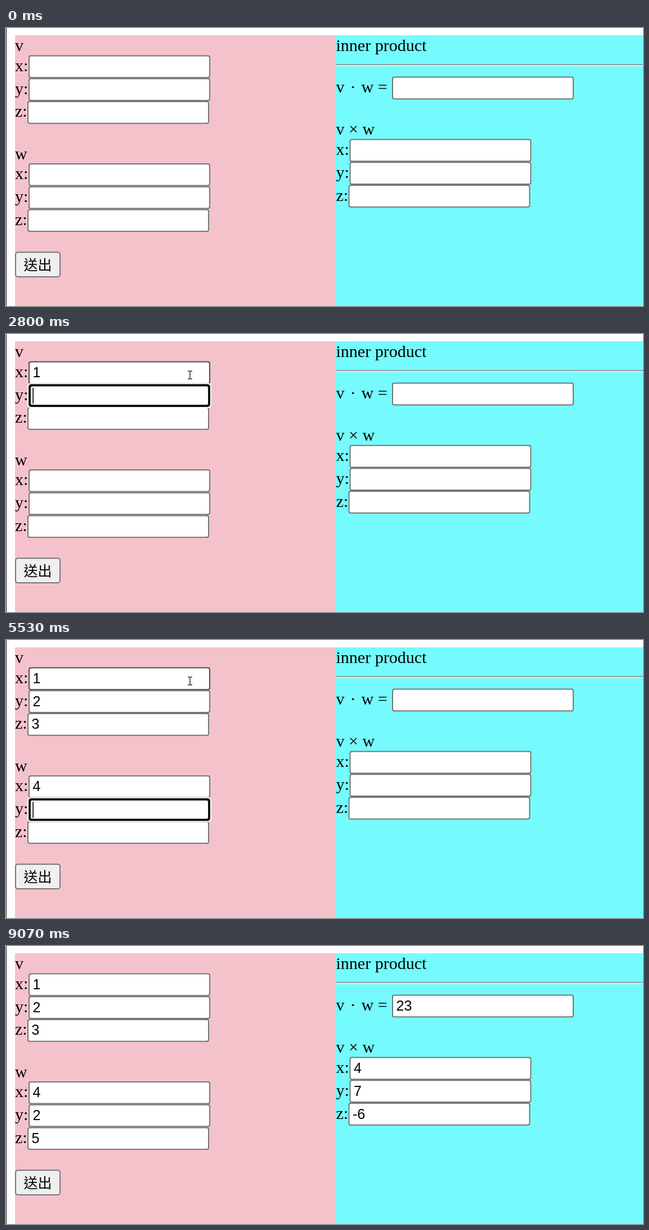
Write an HTML page that moves like this. It is 1132 px wide and 495 px high and loops after 9.87 s.

```html
<!DOCTYPE html>
<html lang="zh-Hant">
<head>
<meta charset="utf-8">
<title>Vector products</title>
<style>
  html, body { margin: 0; width: 100%; height: 100%; overflow: hidden; background: #fff; }
  svg { display: block; width: 1132px; height: 495px; }
  text { white-space: pre; }
  .label { font: 30px "Liberation Serif", "Times New Roman", serif; }
  .value { font: 25px "Liberation Sans", Arial, sans-serif; }
  .button { font: 300 25px "Noto Sans CJK TC", "Noto Sans CJK", sans-serif; }
</style>
</head>
<body>
<svg id="stage" viewBox="0 0 1132 495" xmlns="http://www.w3.org/2000/svg"></svg>
<script>
const LOOP = 9870;
const TICK = 200 / 3;
const PRESS = 8070, RELEASE = 8270;
const FIELD_W = 323, FIELD_H = 40.7, ROW = 40.75;
const GREY = '#767676', DARK = '#4f4f4f';
const stage = document.getElementById('stage');

function add(tag, attrs, parent = stage, text = '') {
  const el = document.createElementNS('http://www.w3.org/2000/svg', tag);
  set(el, attrs);
  if (text) el.textContent = text;
  parent.appendChild(el);
  return el;
}
function set(el, attrs) {
  for (const key in attrs) el.setAttribute(key, attrs[key]);
}
function box(x, y, width, height, fill, rx = 0, parent = stage) {
  return add('rect', { x, y, width, height, fill, rx }, parent);
}
function label(x, y, text) {
  return add('text', { x, y, class: 'label' }, stage, text);
}
function show(el, on) {
  el.setAttribute('visibility', on ? 'visible' : 'hidden');
}

// Page
box(0, 0, 1132, 495, '#fff');
box(0, 0, 1, 495, '#222');
box(16, 13, 570, 482, '#f4c2cb');
box(586, 13, 546, 482, '#75fbfd');
box(586, 64, 546, 2, '#8f9c9c');
box(586, 66, 546, 2, '#e6eeee');
label(16, 41, 'v');
label(16, 233.5, 'w');
label(586.5, 41, 'inner product');
label(586.5, 115, 'v');
set(label(616.5, 115, '·'), { 'text-anchor': 'middle' });
label(631.5, 115, 'w =');
label(586.5, 190, 'v × w');

// Fields
const fields = [];
function field(x, y, value, focus, typed, blur) {
  const g = add('g', {});
  const halo = box(x - 2, y - 2, FIELD_W + 4, FIELD_H + 4, '#fff', 6, g);
  const edge = box(x, y, FIELD_W, FIELD_H, GREY, 4, g);
  const inner = box(x, y, 0, 0, '#fff', 2.5, g);
  const text = add('text', { x: x + 7.5, y: y + 28.4, class: 'value' }, g, String(value));
  const caret = box(x, y + 6.5, 1.6, 28.5, '#000', 0, g);
  fields.push({ x, y, w: FIELD_W, h: FIELD_H, g, halo, edge, inner, text, caret, focus, typed, blur });
}
function vectorFields(left, top, values, times) {
  values.forEach((value, i) => {
    const y = top + ROW * i;
    label(left, y + 28.4, 'xyz'[i] + ':');
    field(left + (i < 2 ? 24 : 22), y, value, ...times[i]);
  });
}

const v = [1, 2, 3], w = [4, 2, 5];
const dot = v.reduce((sum, n, i) => sum + n * w[i], 0);
const cross = v.map((_, i) => {
  const j = (i + 1) % 3, k = (i + 2) % 3;
  return v[j] * w[k] - v[k] * w[j];
});
const result = [Infinity, RELEASE, Infinity];
// focus, typed, blur
vectorFields(16, 48.5, v, [[1470, 2330, 2800], [2800, 3000, 3270], [3270, 3670, 4130]]);
vectorFields(16, 240.9, w, [[4130, 5270, 5530], [5530, 5870, 6070], [6070, 6330, PRESS]]);
field(686, 86.5, dot, ...result);
vectorFields(586.5, 197.6, cross, [result, result, result]);

// Button
const button = { x: 16, y: 398, w: 81, h: 46 };
const buttonEdge = box(16, 398.3, 81, 45.7, GREY, 5);
const buttonFill = box(18, 400.3, 77, 41.7, '#efefef', 3);
add('text', { x: 56.5, y: 431, class: 'button', 'text-anchor': 'middle' }, stage, '送出');

// Pointers, each drawn around its hot spot
const arrow = add('path', {
  d: 'M0 0V14.5L3.3 11.4 5.7 17 8 16 5.6 10.5H10Z',
  fill: '#fff', stroke: '#333', 'stroke-width': 0.9
});
const beam = add('path', {
  d: 'M-4-7H-1.2L0-6 1.2-7H4M0-6V6M-4 7H-1.2L0 6 1.2 7H4',
  fill: 'none', stroke: '#333', 'stroke-width': 1.5
});

const easeOut = p => 1 - (1 - p) ** 3;
const easeBoth = p => p * p * (3 - 2 * p);
const linear = p => p;
// start, end, from, to, easing
const moves = [
  [333, 867, [873, 402], [331, 87], easeOut],
  [867, 1267, [331, 87], [327, 73], easeOut],
  [6930, 7540, [327, 73], [58, 442], easeBoth],
  [7540, 7733, [58, 442], [55, 440], linear],
  [8867, 8933, [55, 440], [84, 452], linear],
  [8933, 9000, [84, 452], [125, 478], linear]
];
const caretOff = [[2070, 2330], [4730, 5270], [6930, 7470], [7930, PRESS]];

function pointerAt(time) {
  if (time < 330 || time >= 9067) return null;
  const t = Math.floor((time + 3.5) / TICK) * TICK;
  let at = moves[0][2];
  for (const [start, end, from, to, ease] of moves) {
    if (t < start) break;
    const p = ease(Math.min(1, (t - start) / (end - start)));
    at = from.map((n, i) => n + (to[i] - n) * p);
  }
  return at;
}
function inside(p, r) {
  return !!p && p[0] >= r.x && p[0] <= r.x + r.w && p[1] >= r.y && p[1] <= r.y + r.h;
}

let front = null;
function render(t) {
  const p = pointerAt(t);
  const blink = caretOff.some(([a, b]) => t >= a && t < b);
  let overField = false, active = null;

  for (const f of fields) {
    const hover = inside(p, f) && !overField;
    const focused = t >= f.focus && t < f.blur;
    const typed = t >= f.typed;
    const line = focused ? 4 : 2;
    overField = overField || hover;
    if (focused) active = f;
    set(f.edge, { fill: focused ? '#101010' : hover ? DARK : GREY, rx: focused ? 5 : 4 });
    set(f.inner, {
      x: f.x + line, y: f.y + line,
      width: FIELD_W - 2 * line, height: FIELD_H - 2 * line
    });
    set(f.caret, { x: f.x + (typed ? 21.2 : 7.3) });
    show(f.halo, focused);
    show(f.text, typed);
    show(f.caret, focused && !blink);
  }
  // The focus ring lies over its neighbours.
  if (active && active !== front) {
    stage.insertBefore(active.g, buttonEdge);
    front = active;
  }

  const hover = inside(p, button);
  const pressed = t >= PRESS && t < RELEASE;
  set(buttonEdge, { fill: pressed ? '#8d8d8d' : hover ? DARK : GREY });
  set(buttonFill, { fill: pressed ? '#f5f5f5' : hover ? '#e5e5e5' : '#efefef' });

  show(arrow, p && !overField);
  show(beam, p && overField);
  if (p) {
    const transform = `translate(${p[0].toFixed(1)} ${p[1].toFixed(1)})`;
    set(arrow, { transform });
    set(beam, { transform });
  }
}

function frame() {
  render(performance.now() % LOOP);
  requestAnimationFrame(frame);
}
frame();
</script>
</body>
</html>
```
